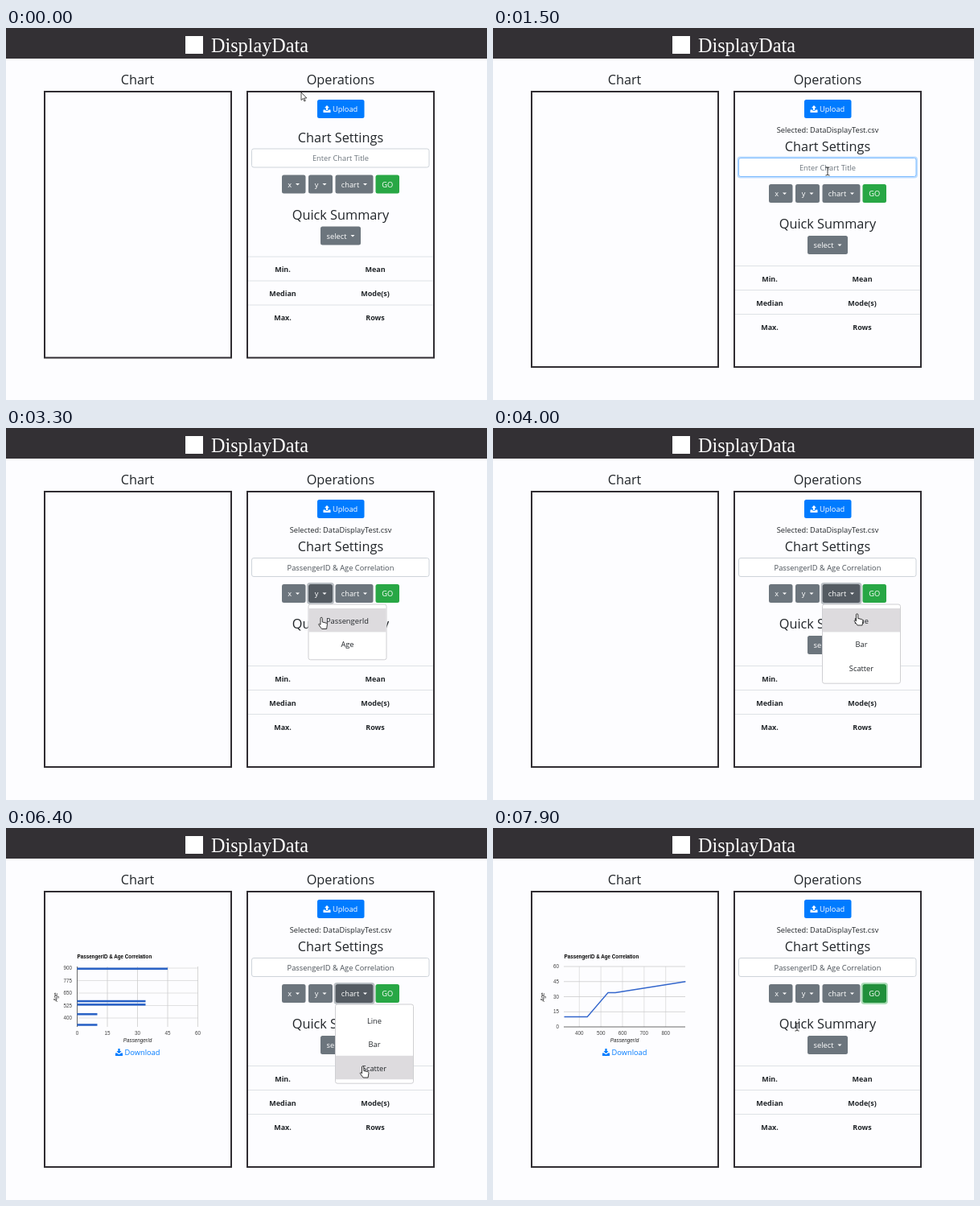
Write an HTML page that moves like this. It is 598 px wide and 462 px high and loops after 8000 ms.

```html
<!DOCTYPE html>
<html lang="en">
<head>
<meta charset="utf-8">
<title>DisplayData</title>
<style>
html, body { margin: 0; width: 100%; height: 100%; overflow: hidden; background: #fdfdff; }
svg { display: block; }
text { font: 9.3px "Open Sans", "Noto Sans", sans-serif; fill: #212529; white-space: pre; }
.head { font-size: 16.3px; }
.brand { font: 24.2px "Liberation Serif", serif; fill: #fff; }
.bold { font-weight: 700; font-size: 9px; }
.btn { fill: #fff; }
.hint { fill: #6c757d; }
.typed { fill: #495057; }
.link { fill: #007bff; }
.axis { font: 6.3px "Liberation Sans", sans-serif; fill: #444; }
.axisTitle { font: italic 6.3px "Liberation Sans", sans-serif; fill: #222; }
.chartTitle { font: bold 6.27px "Liberation Sans", sans-serif; fill: #000; }
.small { font-size: 7px; fill: #111; }
.grey { font-size: 7px; fill: #6d6d6d; }
.dialog { filter: drop-shadow(0 2px 4px #0005); }
</style>
</head>
<body>
<svg id="stage" width="598" height="462" viewBox="0 0 598 462"></svg>
<script>
const LOOP = 8000, TICK = 100;
const TITLE = 'PassengerID & Age Correlation';
const FILE = 'DataDisplayTest.csv';
const DATA = [[330, 10], [437, 10], [533, 34], [567, 34], [892, 45]];

// Pointer stops: time, x, y
const PATH = [
  [0, 367, 80], [200, 414, 102], [400, 414, 102], [600, 160, 72], [700, 160, 72],
  [900, 494, 296], [1000, 484, 259], [1200, 484, 259], [1400, 416, 173], [2200, 416, 173],
  [2400, 358, 206], [2500, 358, 206], [2700, 380, 227], [2800, 380, 227], [3000, 391, 207],
  [3200, 391, 207], [3400, 394, 264], [3500, 394, 264], [3700, 433, 207], [3800, 433, 207],
  [4000, 453, 231], [4100, 453, 231], [4400, 474, 207], [4600, 474, 207], [4900, 433, 207],
  [5000, 433, 207], [5200, 449, 264], [5300, 449, 264], [5500, 474, 207], [5700, 474, 207],
  [6000, 433, 207], [6100, 433, 207], [6400, 444, 296], [6500, 444, 296], [6700, 474, 207],
  [6800, 474, 207], [7000, 433, 207], [7100, 433, 207], [7200, 453, 235], [7300, 453, 235],
  [7500, 474, 207], [7600, 474, 207], [7900, 378, 242]
];
// Value in force from each time on
const MENUS = [[0, ''], [2500, 'x'], [2900, ''], [3200, 'y'], [3500, ''], [3800, 'chart'], [4200, ''],
  [5000, 'chart'], [5300, ''], [6100, 'chart'], [6500, ''], [7100, 'chart'], [7300, '']];
const CHARTS = [[0, ''], [4600, 'line'], [5700, 'bar'], [6800, 'scatter'], [7600, 'line']];
const FOCUS = [[0, ''], [1500, 'title'], [2500, 'x'], [3200, 'y'], [3800, 'chart'], [4500, 'GO'],
  [5000, 'chart'], [5600, 'GO'], [6100, 'chart'], [6700, 'GO'], [7100, 'chart'], [7500, 'GO']];
const ITEMS = { x: ['PassengerId', 'Age'], y: ['PassengerId', 'Age'], chart: ['Line', 'Bar', 'Scatter'] };
const BUTTONS = { x: [343, 29.5], y: [376, 30], chart: [409.5, 47], GO: [459.5, 29.5] };

const at = (list, t) => list.filter(e => e[0] <= t).pop()[1];
const within = (p, x, y, w, h) => p.x >= x && p.x < x + w && p.y >= y && p.y < y + h;
const esc = s => String(s).replace(/&/g, '&amp;');
const rect = (x, y, w, h, fill, more = '') =>
  `<rect x="${x}" y="${y}" width="${w}" height="${h}" fill="${fill}" ${more}/>`;
const line = (x1, y1, x2, y2, color, w = 1) => `<path d="M${x1} ${y1}L${x2} ${y2}" stroke="${color}" stroke-width="${w}"/>`;
const path = (d, fill, more = '') => `<path d="${d}" fill="${fill}" ${more}/>`;
const text = (s, x, y, cls = '', anchor = 'middle') =>
  `<text x="${x}" y="${y}" class="${cls}" text-anchor="${anchor}">${esc(s)}</text>`;
const left = (s, x, y, cls) => text(s, x, y, cls, 'start');
const chevron = (x, y, c = '#555') => path(`M${x - 2.5} ${y - 1.2}l2.5 2.5 2.5-2.5`, 'none', `stroke="${c}"`);

function pointer(t) {
  let i = PATH.findIndex(k => k[0] > t);
  if (i < 0) i = PATH.length;
  const a = PATH[i - 1], b = PATH[i] || a;
  const u = b === a ? 0 : (t - a[0]) / (b[0] - a[0]);
  return { x: a[1] + (b[1] - a[1]) * u, y: a[2] + (b[2] - a[2]) * u };
}

function trayIcon(x, y, up, color) {
  const arrow = up ? 'M4.5 0l3 3.2h-1.9v3h-2.2v-3H1.5z' : 'M3.4 0h2.2v3h1.9l-3 3.2-3-3.2h1.9z';
  return `<g transform="translate(${x} ${y})">` + path(arrow, color) +
    path('M0 5.6h2.4l1 1.4h2.2l1-1.4H9V9H0z', color) + '</g>';
}

function button(label, x, y, w, fill, ring, caret) {
  const halo = ring ? rect(x - 1, y - 1, w + 2, 25, 'none', `rx="3" stroke="${ring}" stroke-width="2"`) : '';
  const mid = x + w / 2;
  return halo + rect(x, y, w, 23, fill, 'rx="2.5"') +
    text(label, caret ? mid - 5 : mid, y + 15, 'btn') +
    (caret ? path(`M${x + w - 12.5} ${y + 10.5}h5l-2.5 2.6z`, '#fff') : '');
}

function page(t, p, s) {
  const shift = s.loaded ? 11.5 : 0;
  const panelH = s.loaded ? 342 : 330.5;
  const frame = x => rect(x, 79, 232, panelH, 'none', 'stroke="#302d32" stroke-width="2"');
  let out = rect(0, 0, 598, 462, '#fdfdff') + rect(0, 0, 598, 38, '#333034') +
    rect(223, 10, 22, 22, '#fff') + left('DisplayData', 255, 30, 'brand') +
    text('Chart', 163.5, 69.5, 'head') + text('Operations', 416, 69.5, 'head') + frame(48) + frame(300);

  const overUpload = !s.dialog && within(p, 387, 89, 58, 23);
  out += rect(387, 89, 58.5, 23, overUpload ? '#0069d9' : '#007bff', 'rx="2.5"') +
    trayIcon(394.5, 96, true, '#fff') + left('Upload', 406, 104, 'btn');
  if (s.loaded) out += text('Selected: ' + FILE, 416, 129.5);

  const active = s.focus === 'title';
  out += `<g transform="translate(0 ${shift})">` + text('Chart Settings', 416, 141.5, 'head');
  if (active) out += rect(304.5, 149, 222.5, 25, 'none', 'rx="3" stroke="#bfdeff" stroke-width="2"');
  out += rect(305.5, 150, 220.5, 23, '#fff', `rx="2.5" stroke="${active ? '#80bdff' : '#ced4da'}"`) +
    (s.typed ? text(s.typed, 416, 165.2, 'typed') : text('Enter Chart Title', 416, 165.2, 'hint'));

  for (const [name, [x, w]] of Object.entries(BUTTONS)) {
    const go = name === 'GO', on = s.focus === name;
    const dark = s.menu === name || (go && on) || (!s.dialog && within(p, x, 194, w, 23));
    const fill = go ? (dark ? '#218f3b' : '#28a745') : (dark ? '#545b62' : '#6c757d');
    out += button(name, x, 182.5, w, fill, on && (go ? '#a9dcb5' : '#b9bec3'), !go);
  }
  out += text('Quick Summary', 416, 237.5, 'head') + button('select', 391, 246.5, 50, '#6c757d', '', true);
  [['Min.', 'Mean'], ['Median', 'Mode(s)'], ['Max.', 'Rows']].forEach(([a, b], i) => {
    const y = 284 + i * 30;
    out += line(301, y, 531, y, '#dee2e6') + text(a, 344, y + 19, 'bold') + text(b, 459, y + 19, 'bold');
  });
  return out + '</g>';
}

function menu(name, p) {
  const items = ITEMS[name], x = BUTTONS[name][0];
  return rect(x, 219, 97, 10 + items.length * 29.4, '#fff', 'rx="2.5" stroke="#cfcfd2"') +
    items.map((label, i) => {
      const y = 224 + i * 29.4;
      const bg = within(p, x, y, 97, 29.4) ? rect(x + .5, y, 96, 29.4, '#dddbde') : '';
      return bg + text(label, x + 48.5, y + 18.7);
    }).join('');
}

function chart(kind) {
  const bar = kind === 'bar';
  const idX = id => 88.5 + (id - 330) * .2685, ageY = a => 247 - a * 1.25;
  const idY = id => 174 + (900 - id) * .124, ageX = a => 88.5 + a * 2.5;
  const ids = bar ? [900, 775, 650, 525, 400] : [400, 500, 600, 700, 800];
  let out = text(TITLE, 88.5, 162, 'chartTitle', 'start');
  for (const id of ids) {
    out += bar ? line(88, idY(id), 239, idY(id), '#d4d4d4', .7) + text(id, 82, idY(id) + 2, 'axis', 'end')
      : line(idX(id), 172, idX(id), 247, '#d4d4d4', .7) + text(id, idX(id), 256.5, 'axis');
  }
  for (const a of [0, 15, 30, 45, 60]) {
    out += bar ? line(ageX(a), 172, ageX(a), 247, a ? '#ccc' : '#444', .8) + text(a, ageX(a), 256.5, 'axis')
      : line(88, ageY(a), 239, ageY(a), a ? '#ccc' : '#444', .8) + text(a, 82, ageY(a) + 2.2, 'axis', 'end');
  }
  if (bar) out += DATA.map(([id, a]) => rect(88.5, idY(id) - 1.5, a * 2.5, 2.6, '#2b63c6')).join('');
  else if (kind === 'line') {
    out += path('M' + DATA.map(([id, a]) => idX(id) + ' ' + ageY(a)).join('L'), 'none',
      'stroke="#3366cc" stroke-width="1.3"');
  } else out += DATA.map(([id, a]) => `<circle cx="${idX(id)}" cy="${ageY(a)}" r="2.2" fill="#3366cc"/>`).join('');
  return out + text('PassengerId', 163.5, 266.3, 'axisTitle') +
    `<g transform="translate(64 210) rotate(-90)">${text('Age', 0, 0, 'axisTitle')}</g>` +
    trayIcon(136, 274, false, '#007bff') + left('Download', 147.5, 282, 'link');
}

function sideIcon(kind, x, y) {
  const box = (w, h, c) => rect(x - w / 2, y - h / 2, w, h, c);
  switch (kind) {
    case 'down': return path(`M${x - 1.5} ${y - 4}h3v4h3l-4.500 4.500-4.500-4.500h3z`, '#2f7fd0');
    case 'doc': return rect(x - 3.5, y - 4, 7, 8, '#fff', 'stroke="#7b8794" stroke-width=".8"') +
      line(x - 2, y - 1, x + 2, y - 1, '#3f94d6') + line(x - 2, y + 1.5, x + 2, y + 1.5, '#3f94d6');
    case 'pic': return rect(x - 4.500, y - 3.5, 9, 7, '#d8eefa', 'stroke="#8a9aa5" stroke-width=".8"') +
      path(`M${x - 4} ${y + 3}l3-3 2 1.500 3-1v2.500z`, '#3b86b5');
    case 'dot': return `<circle cx="${x}" cy="${y}" r="4" fill="#1b79cf"/>`;
    case 'note': return path(`M${x} ${y + 2.500}v-6.500q1 2 3 3.500`, 'none', 'stroke="#1a87d8" stroke-width="1.300"') +
      `<circle cx="${x - 1.5}" cy="${y + 2.5}" r="2" fill="#1a87d8"/>`;
    case 'film': return box(9, 8, '#40454d') + box(5, 5, '#8797ab');
    case 'disk': return rect(x - 4.5, y, 9, 3, '#69737d') + rect(x - 4, y - 3, 4, 2.5, '#2a9be0');
    case 'cube': return path(`M${x} ${y - 4}l4 2v4l-4 2-4-2v-4z`, '#35a9c9');
    default: return box(9, 6, '#1c8ad8') + line(x - 3, y + 4.2, x + 3, y + 4.2, '#65788a');
  }
}

function dialog(chosen) {
  let out = '<g class="dialog">' + rect(3, -10, 577, 284, '#f0f0f0', 'stroke="#85858a" stroke-width=".8"') +
    '</g>' + rect(3.5, -10, 576, 240.5, '#fff') + line(4, 7.5, 580, 7.5, '#e6e6e6') +
    left('Organize', 15, 2, 'small') + left('New folder', 69, 2, 'small') +
    rect(506, -3, 10, 5, '#aeb8c0') + rect(540, -3, 10, 5, '#5c9bc9') +
    '<circle cx="566" cy="-1" r="4.500" fill="#1b75bb"/>';

  out += rect(4, 105.8, 85, 14.2, '#d9d9d9');
  [['Downloads', 15, 1, 'down'], ['Documents', 30, 1, 'doc'], ['Pictures', 44, 1, 'pic'],
   ['HazeCrate', 64, 0, 'dot'], ['This PC', 83, 0, 'pc'], ['3D Objects', 98, 1, 'cube'],
   ['Desktop', 113, 1, 'pc'], ['Documents', 127.5, 1, 'doc'], ['Downloads', 142, 1, 'down'],
   ['Music', 156.500, 1, 'note'], ['Pictures', 171, 1, 'pic'], ['Videos', 186, 1, 'film'],
   ['Primary (C:)', 200.5, 1, 'disk'], ['Network', 220, 0, 'pc']
  ].forEach(([label, y, deep, icon]) => {
    out += sideIcon(icon, deep ? 28 : 23, y) + left(label, deep ? 36 : 31, y + 2.6, 'small');
    if (y < 50) out += path(`M81 ${y + 2.5}l2-2m-1-2l3 3m-2-4l3 3`, 'none', 'stroke="#888" stroke-width=".9"');
  });
  out += rect(89, 8, 9.5, 219, '#f0f0f0') + rect(89, 45, 9.5, 108, '#cdcdcd') + chevron(93.7, 222);
  out += path('M91.200 14l2.500-2.500 2.500 2.500', 'none', 'stroke="#555"');

  [['Name', 112], ['Date modified', 271], ['Type', 345], ['Size', 418]].forEach(([label, x]) => {
    out += left(label, x, 18.3, 'grey');
  });
  [267, 340.5, 414, 462].forEach(x => out += line(x, 9, x, 24, '#e3e3e3'));
  out += path('M185.500 11l2-2 2 2', 'none', 'stroke="#999" stroke-width=".8"');
  if (chosen) out += rect(110, 66, 352, 12.5, '#cce8ff', 'stroke="#99d1ff" stroke-width=".8"');
  [['train.csv', '5/16/2018 6:33 PM', 60], ['test.csv', '5/16/2018 6:33 PM', 28],
   ['gender_submission.csv', '5/16/2018 6:33 PM', 4], [FILE, '6/17/2018 6:42 PM', 1]
  ].forEach(([name, date, size], i) => {
    const y = 33.5 + i * 12.8;
    out += rect(112.5, y - 4, 8, 8, '#1f7244') + left(name, 124, y + 2.6, 'small') +
      left(date, 271, y + 2.6, 'grey') + left('Norvantic Gridel C...', 345, y + 2.6, 'grey') +
      text(size + ' KB', 458.5, y + 2.6, 'grey', 'end');
  });

  const push = (label, x, border, w) => rect(x, 251, 52.5, 14, '#e1e1e1', `stroke="${border}" stroke-width="${w}"`) +
    text(label, x + 26, 260.6, 'small');
  return out + text('File name:', 115.5, 242.5, 'small', 'end') +
    rect(119, 233.5, 328, 13.5, '#fff', 'stroke="#0078d7"') + chevron(442, 240) +
    (chosen ? left(FILE, 121, 242.8, 'small') : '') +
    rect(455, 233.5, 114, 13.5, '#e4e4e4', 'stroke="#adadad" stroke-width=".8"') +
    left('*.csv', 458, 242.8, 'small') + chevron(564, 240) +
    push('Open', 456, '#0078d7', 1.4) + push('Cancel', 516.5, '#adadad', .8) +
    path('M578 268v4h-4z', '#b5b5b5');
}

function cursor(p, s) {
  const overMenu = s.menu && within(p, BUTTONS[s.menu][0], 219, 97, 98);
  const overButton = within(p, 387, 89, 58, 23) ||
    Object.values(BUTTONS).some(([x, w]) => within(p, x, 194, w, 23));
  const overText = within(p, 305, 161, 221, 24) || within(p, 357, 235, 118, 17);
  let shape;
  if (!s.dialog && (overMenu || overButton)) {
    shape = path('M-1.500 1q0-1.300 1.100-1.300T.8 1v4.500l5 1.200q1.200.4 1.100 1.800l-.8 5.500h-6L-3.300 9.500q-1-1.500.2-1.900l1.600 1.200z',
      '#fff', 'stroke="#222" stroke-width=".9"');
  } else if (!s.dialog && overText) {
    shape = path('M-2.500 0q2 0 2.500 1 .5-1 2.500-1M0 1v8M-2.500 10q2 0 2.500-1 .5 1 2.500 1', 'none', 'stroke="#222" stroke-width=".9"');
  } else {
    shape = path('M0 0v9.600l2.300-2.100 1.600 3.500 1.400-.6-1.600-3.400h3.100z', '#fff', 'stroke="#222" stroke-width=".8"');
  }
  return `<g transform="translate(${p.x.toFixed(1)} ${p.y.toFixed(1)})">${shape}</g>`;
}

function scene(t) {
  const p = pointer(t);
  const share = Math.min(1, Math.max(0, (t - 1500) / 700));
  const s = {
    dialog: t >= 400 && t < 1200,
    loaded: t >= 1200,
    typed: TITLE.slice(0, Math.round(share * TITLE.length)),
    menu: at(MENUS, t), focus: at(FOCUS, t), chart: at(CHARTS, t)
  };
  return page(t, p, s) + (s.chart ? chart(s.chart) : '') + (s.menu ? menu(s.menu, p) : '') +
    (s.dialog ? dialog(t >= 700) : '') + cursor(p, s);
}

const stage = document.getElementById('stage');
const start = performance.now();
let shown = -1;
function run() {
  const t = Math.floor((performance.now() - start) % LOOP / TICK) * TICK;
  if (t !== shown) stage.innerHTML = scene(shown = t);
  requestAnimationFrame(run);
}
run();
</script>
</body>
</html>
```
